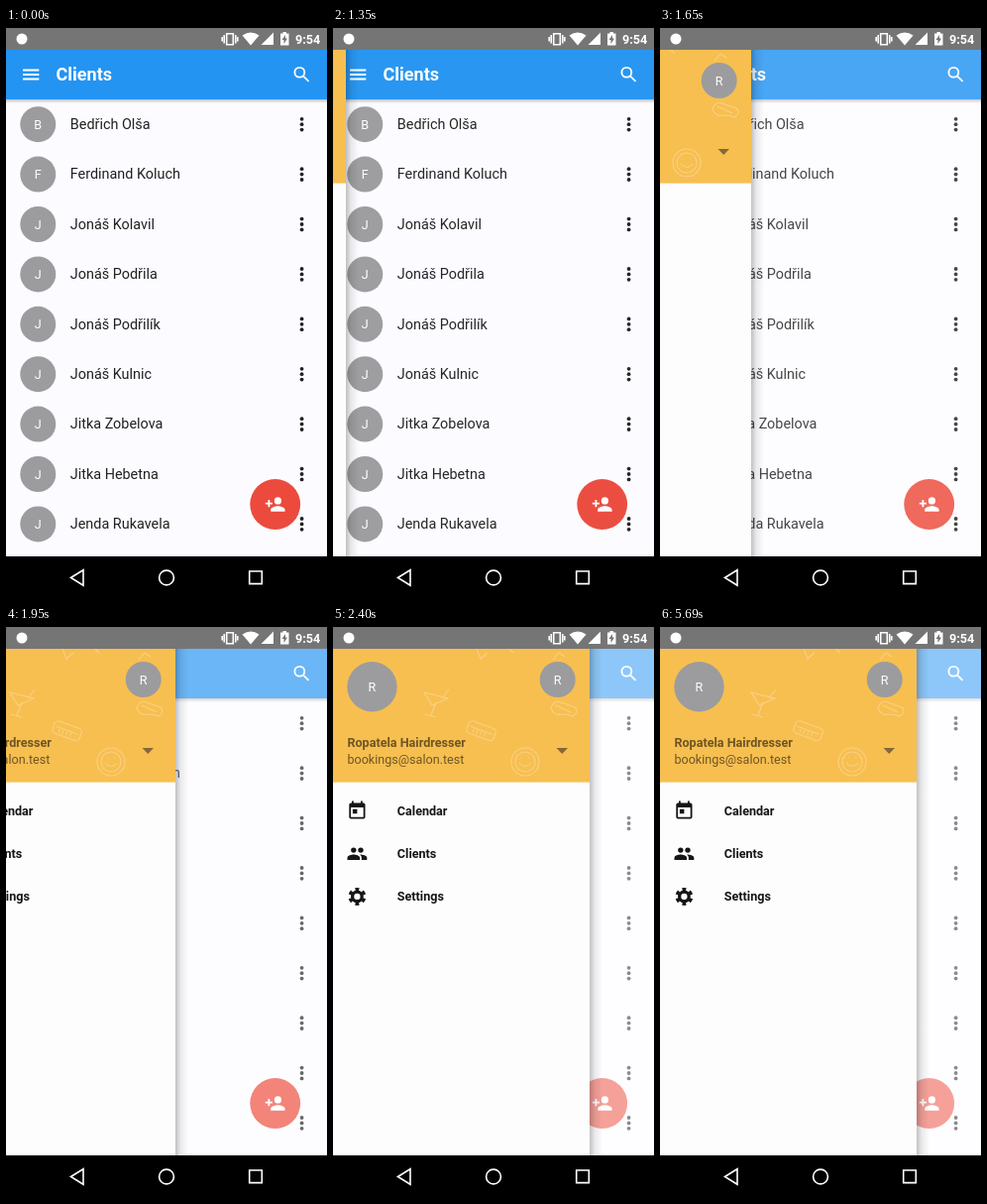
An HTML page that plays this animation: 324x576 px, repeating every 8 s.

```html
<!DOCTYPE html>
<html lang="en">
<head>
<meta charset="utf-8">
<title>Clients drawer</title>
<style>
  html, body { margin: 0; width: 100%; height: 100%; overflow: hidden; background: #000; }
  svg { display: block; width: 100%; height: 100%; }
  text { font-family: Roboto, sans-serif; font-size: 12.6px; }
  .bold { font-weight: 600; }
  .initial { fill: #fff; text-anchor: middle; }
  .name { font-size: 14.4px; fill: #212121; }
  .menu { fill: #151515; }
  .avatar { fill: #9c9c9e; }
  .line { fill: none; stroke: #fff; stroke-width: 1.6; }
  .pattern { fill: none; stroke: #fad084; stroke-width: 1.1; }
</style>
</head>
<body>
<svg viewBox="0 0 324 576">
  <defs>
    <linearGradient id="edge">
      <stop offset="0" stop-opacity=".24"/>
      <stop offset=".4" stop-opacity=".08"/>
      <stop offset="1" stop-opacity="0"/>
    </linearGradient>
    <linearGradient id="drop" x2="0" y2="1">
      <stop offset="0" stop-opacity=".24"/>
      <stop offset="1" stop-opacity="0"/>
    </linearGradient>
  </defs>

  <rect y="22" width="324" height="511" fill="#fcfbff"/>
  <g id="list"></g>
  <rect y="72" width="324" height="4" fill="url(#drop)"/>
  <rect y="22" width="324" height="50" fill="#2494f2"/>
  <g id="toolbar"></g>
  <text class="bold" x="50.5" y="53" style="font-size:18px" fill="#fff">Clients</text>
  <circle cx="271.7" cy="480.5" r="25.4" fill="#eb4a3c"/>
  <g id="fab"></g>
  <rect id="scrim" y="22" width="324" height="511" fill="#fff"/>

  <g id="drawer">
    <rect x="259" y="22" width="13" height="511" fill="url(#edge)"/>
    <rect y="22" width="259" height="511" fill="#fdfdfe"/>
    <rect y="22" width="259" height="134.6" fill="#f7bf50"/>
    <g class="pattern">
      <path d="M92 66l24 6-16 7zM104 76l-5 13m-6-1l11 3M110 72l7-9"/>
      <g transform="rotate(20 149 105)">
        <rect x="135" y="98" width="29" height="13" rx="4"/>
        <path d="M138 104h23M142 105v4m4-4v4m4-4v4m4-4v4"/>
      </g>
      <circle cx="194" cy="136" r="14"/>
      <circle cx="194" cy="136" r="10"/>
      <path d="M188 137q6 7 12 0M190 132h1m6 0h1"/>
      <path d="M220 82q3-9 10-6l14 5q5 5-2 9-5-2-11-2-8 2-11-6zM225 79l15 7"/>
      <path d="M145 22l4 10 7-6M222 33l6-7 6 4M178 22l4 4"/>
    </g>
    <circle class="avatar" cx="39.5" cy="60.3" r="25.2"/>
    <text class="initial" x="39.5" y="64.7">R</text>
    <circle class="avatar" cx="226.7" cy="53" r="18"/>
    <text class="initial" x="226.7" y="57.5">R</text>
    <text class="bold" x="14.4" y="120.5" fill="#6e5524">Ropatela Hairdresser</text>
    <text x="14.4" y="137.5" fill="#6e5524">bookings@salon.test</text>
    <path id="arrow" fill="#84683a"/>
    <g id="pages"></g>
    <g id="accounts"><rect y="164" width="259" height="43" fill="#f2f2f3"/></g>
  </g>

  <rect width="324" height="22" fill="#757575"/>
  <g fill="#fff">
    <circle cx="16" cy="11" r="5.5"/>
    <path d="M238.5 7.5Q247 1.5 255.5 7.5L247 17.5zM270 4.5V17H257.5z"/>
    <path fill-rule="evenodd" d="M277 5.5h2.500V4h3.500v1.500h2.500V17.500H277zM282 7l-3.500 5h2v4l3.500-5.500h-2z"/>
    <text class="bold" x="292" y="15.5">9:54</text>
  </g>
  <path class="line" d="M222.700 5.700h6.600v11h-6.600zM220.200 7v8.500M231.800 7v8.500M218.200 9v4.500M233.800 9v4.500"/>

  <rect y="533" width="324" height="43"/>
  <path class="line" d="M65.500 554.500L78 546.700v15.600zM245.700 548h12.600v12.600h-12.600z"/>
  <circle class="line" cx="162" cy="554.5" r="7.4"/>
</svg>
<script>
const $ = id => document.getElementById(id);
const add = (id, markup) => $(id).insertAdjacentHTML('beforeend', markup);

// Icons are drawn on a 24-unit grid.
const path = d => `<path d="${d}"/>`;
const icons = {
  menu: path('M3 18h18v-2H3zM3 13h18v-2H3zM3 6v2h18V6z'),
  search: '<g fill="none" stroke="#fff" stroke-width="2"><circle cx="9.5" cy="9.5" r="5.5"/><path d="M13.700 13.700l6 6"/></g>',
  more: [6, 12, 18].map(y => `<circle cx="12" cy="${y}" r="2.1"/>`).join(''),
  addPerson: '<circle cx="15" cy="8" r="4"/>' +
    path('M6 10V7H4v3H1v2h3v3h2v-3h3v-2zM15 14c-2.670 0-8 1.340-8 4v2h16v-2c0-2.660-5.330-4-8-4z'),
  calendar: '<path fill-rule="evenodd" d="M19 3h-1V1h-2v2H8V1H6v2H5q-2 0-2 2v14q0 2 2 2h14q2 0 2-2V5q0-2-2-2zM19 19H5V8h14zM7 10h5v5H7z"/>',
  people: '<circle cx="8" cy="8" r="3"/><circle cx="16" cy="8" r="3"/>' +
    path('M8 13c-2.300 0-7 1.200-7 3.500V19h14v-2.500C15 14.200 10.300 13 8 13zM15 13q2 1.500 2 3.500V19h6v-2.500c0-2.300-4.700-3.500-8-3.500z'),
  gear: '<g fill="none" stroke="#151515" stroke-width="3.6"><circle cx="12" cy="12" r="5.3"/>' +
    '<circle cx="12" cy="12" r="8.2" pathLength="12" stroke-dasharray="1" stroke-dashoffset="-.5"/></g>',
  home: path('M10 20v-6h4v6h5v-8h3L12 3 2 12h3v8z'),
  plus: path('M19 13h-6v6h-2v-6H5v-2h6V5h2v6h6z')
};
const icon = (name, x, y, fill) =>
  `<g fill="${fill}" transform="translate(${x} ${y}) scale(.9) translate(-12 -12)">${icons[name]}</g>`;

const clients = ['Bedřich Olša', 'Ferdinand Koluch', 'Jonáš Kolavil', 'Jonáš Podřila', 'Jonáš Podřilík',
  'Jonáš Kulnic', 'Jitka Zobelova', 'Jitka Hebetna', 'Jenda Rukavela'];
clients.forEach((name, i) => {
  const y = 97.2 + 50.4 * i;
  add('list', `<circle class="avatar" cx="32.3" cy="${y}" r="18"/>
    <text class="initial" x="32.3" y="${y + 4.5}">${name[0]}</text>
    <text class="name" x="64.8" y="${y + 4.8}">${name}</text>` + icon('more', 298.6, y, '#212121'));
});

add('toolbar', icon('menu', 25.2, 47, '#fff') + icon('search', 298.6, 47));
add('fab', icon('addPerson', 271.7, 480.5, '#fff'));

const addMenu = (id, rows) => rows.forEach(([name, label], i) => {
  const y = 185.5 + 43.2 * i;
  add(id, icon(name, 24.4, y, '#151515') + `<text class="menu bold" x="64.8" y="${y + 4.5}">${label}</text>`);
});
addMenu('pages', [['calendar', 'Calendar'], ['people', 'Clients'], ['gear', 'Settings']]);
addMenu('accounts', [['home', 'Ropatela Hairdresser'], ['home', 'Ropatela Lessons'], ['plus', 'Add business']]);

const LOOP = 8000, WIDTH = 259, OPEN_AT = 1050, STEP = 150;
const edges = [4, 9, 13, 50, 92, 132, 171, 218, 256, WIDTH];

function draw() {
  const t = performance.now() % LOOP;
  const step = Math.floor((t - OPEN_AT) / STEP);
  const edge = step < 0 ? 0 : edges[Math.min(step, edges.length - 1)];
  const showAccounts = t >= 4340 && t < 5690;

  $('drawer').setAttribute('transform', `translate(${edge - WIDTH})`);
  $('drawer').style.display = edge ? '' : 'none';
  $('scrim').setAttribute('opacity', 0.48 * edge / WIDTH);
  $('pages').style.display = showAccounts ? 'none' : '';
  $('accounts').style.display = showAccounts ? '' : 'none';
  $('arrow').setAttribute('d', showAccounts ? 'M225.500 127h11.500l-5.750-6z' : 'M225.500 122h11.500l-5.750 6z');
  requestAnimationFrame(draw);
}
draw();
</script>
</body>
</html>
```
